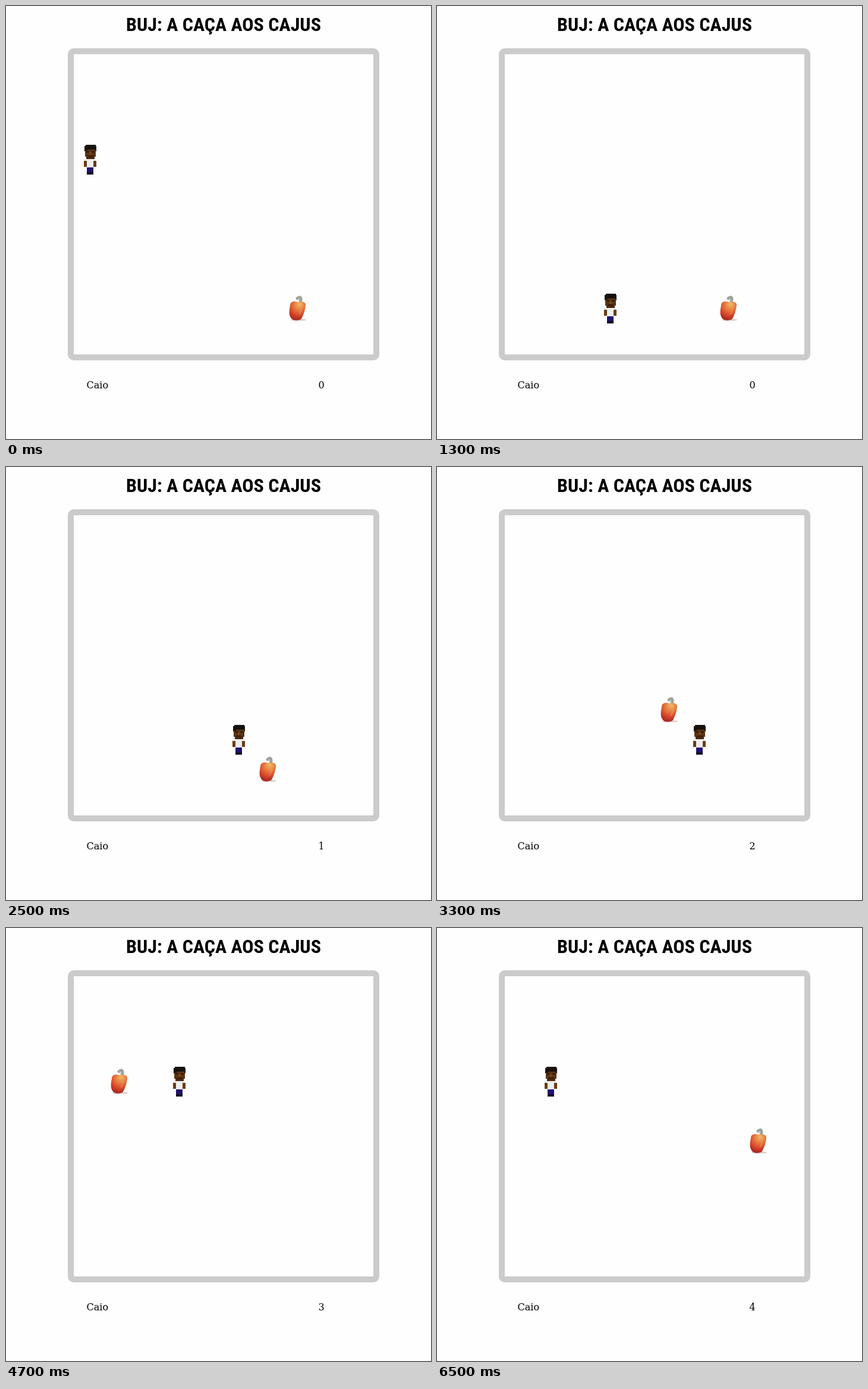
Write an HTML page with a canvas that moves like this. It is 715x727 px and loops after 6.7 s.

```html
<!DOCTYPE html>
<html lang="pt">
<head>
<meta charset="utf-8">
<title>BUJ: A CAÇA AOS CAJUS</title>
<style>
  html, body { margin: 0; width: 100%; height: 100%; overflow: hidden; background: #fefefe; }
  canvas, svg { position: absolute; left: 0; top: 0; width: 715px; height: 727px; }
  text { font: 16px "DejaVu Serif", serif; fill: #000; }
  #title {
    font: bold 32px "Liberation Sans Narrow", "Roboto Condensed", Roboto, sans-serif;
    font-stretch: 75%;
    text-anchor: middle;
  }
</style>
</head>
<body>
<canvas id="stage" width="715" height="727"></canvas>
<svg viewBox="0 0 715 727">
  <text id="title" x="366" y="42">BUJ: A CAÇA AOS CAJUS</text>
  <text x="135.5" y="642">Caio</text>
  <text id="score" x="525.5" y="642">0</text>
</svg>
<script>
const LOOP = 6700, CELL = 50;
const ctx = document.getElementById('stage').getContext('2d');
const title = document.getElementById('title');
const score = document.getElementById('score');

// Keep the title inside its line if only a wider face is available
const TITLE_WIDTH = 334;
const width = title.getComputedTextLength();
if (width > TITLE_WIDTH) title.style.fontSize = 32 * TITLE_WIDTH / width + 'px';

// Key presses: time in units of 100 ms, then direction
const KEYS = ('2D 3D 5D 6D 7R 10D 11R 13R 14R 16R 18R 19R 22U 23L 25L 27D 28R ' +
  '33U 34L 37U 41U 43L 44U 45L 47U 48L 50L').split(' ')
  .map(k => ({ t: parseInt(k) * 100, dir: k.slice(-1) }));
const DIRS = { U: [0, -1], D: [0, 1], L: [-1, 0], R: [1, 0] };
const FRUITS = [[7, 5], [6, 5], [5, 3], [1, 0], [8, 2]];
const POINTER = [[5500, 286, 702], [5600, 226, 331], [5800, 186, 232],
                 [5900, 121, 108], [6000, 72, 6]];
const POINTER_END = 6100;

function sprite(w, h, blur, paint) {
  const c = document.createElement('canvas');
  c.width = w;
  c.height = h;
  const g = c.getContext('2d');
  g.filter = `blur(${blur}px)`;
  paint(g);
  return c;
}

function rect(g, color, x, y, w, h) {
  g.fillStyle = color;
  g.fillRect(x, y, w, h);
}

const boy = sprite(50, 56, 0.7, g => {
  rect(g, '#e9e9e7', 14, 27, 17, 14);
  rect(g, '#1b1512', 17, 3, 17, 4);
  rect(g, '#17110e', 15, 5, 20, 9);
  rect(g, '#5a3312', 16, 11, 18, 12);
  rect(g, '#4a290e', 18, 22, 14, 5);
  rect(g, '#1c120c', 16, 10, 4, 3);
  rect(g, '#2b180a', 18, 14, 5, 2);
  rect(g, '#2b180a', 27, 14, 5, 2);
  rect(g, '#734418', 23, 15, 4, 5);
  rect(g, '#35190a', 21, 21, 8, 2);
  rect(g, '#efefef', 16, 27, 18, 14);
  rect(g, '#6b3c16', 14, 30, 5, 10);
  rect(g, '#6b3c16', 30, 30, 5, 10);
  rect(g, '#22106c', 19, 41, 11, 9);
  rect(g, '#120a24', 19, 49, 11, 4);
});

const caju = sprite(50, 50, 0.6, g => {
  g.fillStyle = 'rgba(150,110,95,.35)';
  g.beginPath();
  g.ellipse(28, 44, 13, 1.6, 0, 0, 7);
  g.fill();

  g.lineWidth = 5;
  g.lineCap = 'round';
  g.strokeStyle = '#9ba49a';
  g.beginPath();
  g.moveTo(26, 8);
  g.quadraticCurveTo(32, 3, 32, 10);
  g.lineTo(31, 15);
  g.stroke();
  g.lineWidth = 1.6;
  g.strokeStyle = '#d0d5cb';
  g.beginPath();
  g.moveTo(28, 9);
  g.lineTo(29, 13);
  g.stroke();

  const skin = g.createRadialGradient(30, 17, 1, 28, 22, 25);
  skin.addColorStop(0, '#efb665');
  skin.addColorStop(0.3, '#e88243');
  skin.addColorStop(0.62, '#d9482a');
  skin.addColorStop(1, '#971c1c');
  g.fillStyle = skin;
  g.beginPath();
  g.moveTo(14, 20);
  g.bezierCurveTo(14, 13, 21, 12, 27, 14);
  g.bezierCurveTo(34, 12, 41, 14, 40, 20);
  g.bezierCurveTo(39, 29, 36, 36, 33, 42);
  g.bezierCurveTo(29, 46, 18, 46, 15, 40);
  g.bezierCurveTo(11, 34, 13, 26, 14, 20);
  g.fill();

  g.lineWidth = 2;
  g.strokeStyle = 'rgba(246,160,90,.5)';
  g.beginPath();
  g.moveTo(34, 20);
  g.quadraticCurveTo(33, 28, 30, 34);
  g.stroke();
});

function drawPointer(x, y) {
  ctx.save();
  ctx.translate(x, y);
  ctx.shadowColor = 'rgba(0,0,0,.35)';
  ctx.shadowBlur = 2;
  ctx.shadowOffsetX = ctx.shadowOffsetY = 1;
  ctx.beginPath();
  [[0, 0], [0, 14.5], [3.3, 11.4], [5.6, 16.6], [7.8, 15.6], [5.6, 10.6], [9.8, 10.2]]
    .forEach(p => ctx.lineTo(...p));
  ctx.closePath();
  ctx.lineWidth = 1.4;
  ctx.strokeStyle = '#fff';
  ctx.stroke();
  ctx.shadowColor = 'transparent';
  ctx.fillStyle = '#222';
  ctx.fill();
  ctx.restore();
}

function stateAt(t) {
  let x = 0, y = 0, points = 0;
  for (const key of KEYS) {
    if (key.t > t) break;
    x += DIRS[key.dir][0];
    y += DIRS[key.dir][1];
    const [fx, fy] = FRUITS[points];
    if (x === fx && y === fy) points++;
  }
  return { x, y, points };
}

function draw(t) {
  const { x, y, points } = stateAt(t);
  rect(ctx, '#fefefe', 0, 0, 715, 727);
  ctx.fillStyle = '#cbcbcb';
  ctx.beginPath();
  ctx.roundRect(104, 71, 524, 524, 10);
  ctx.fill();
  rect(ctx, '#fefefe', 114, 81, 504, 504);

  const [fx, fy] = FRUITS[points];
  ctx.drawImage(caju, 114 + fx * CELL, 233 + fy * CELL);
  ctx.drawImage(boy, 117 + x * CELL, 230 + y * CELL);
  if (score.textContent !== String(points)) score.textContent = points;

  const at = POINTER.filter(p => p[0] <= t).pop();
  if (at && t < POINTER_END) drawPointer(at[1], at[2]);
}

const start = performance.now();
function tick() {
  draw((performance.now() - start) % LOOP);
  requestAnimationFrame(tick);
}
tick();
</script>
</body>
</html>
```
